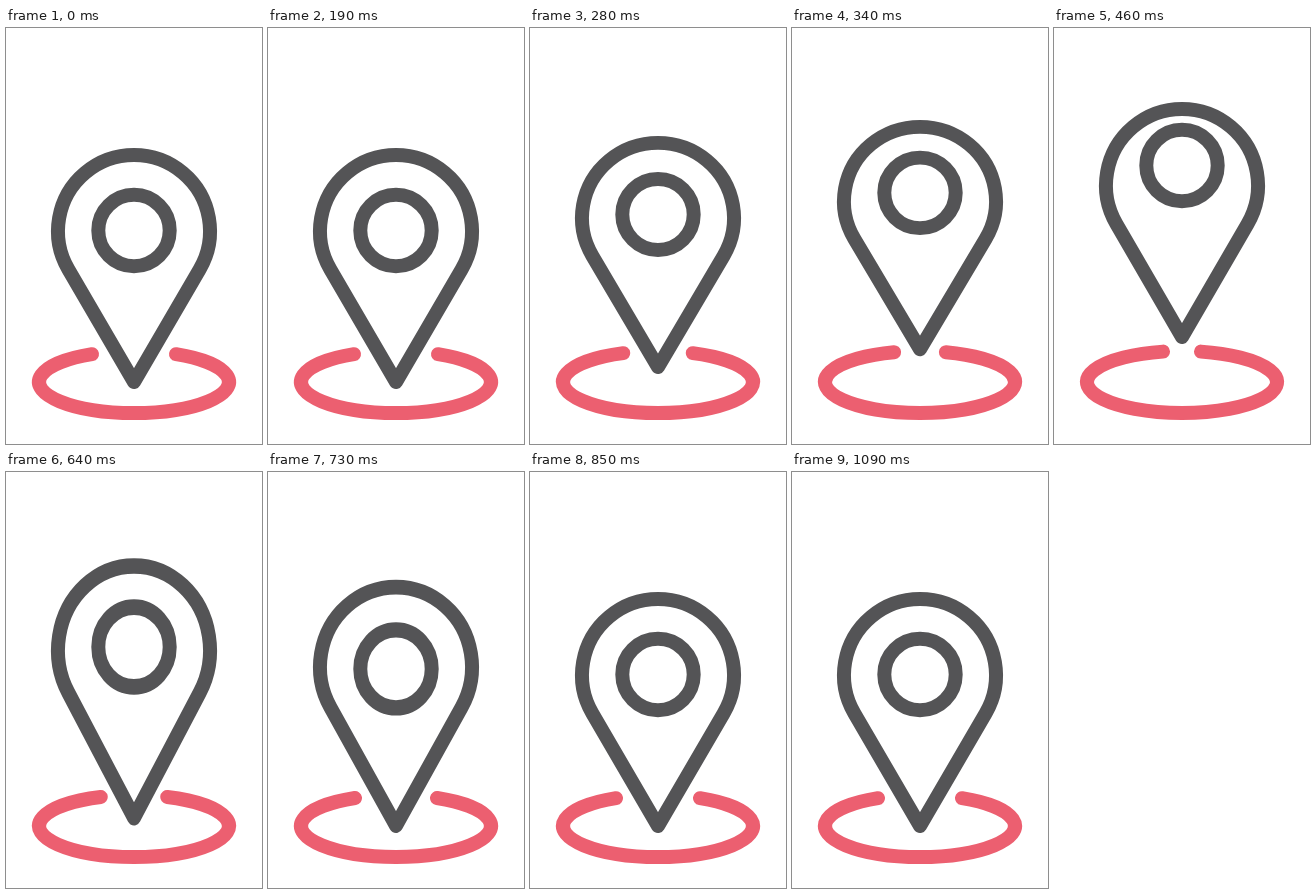
These frames come from a looping animation (256 by 416 pixels, 1.12 s). An HTML page:

```html
<!DOCTYPE html>
<html lang="en">
<head>
<meta charset="utf-8">
<title>Hopping map pin</title>
<style>
  html, body { margin: 0; width: 100%; height: 100%; overflow: hidden; background: #fff; }
  svg { display: block; width: 256px; height: 416px; }
  svg * { fill: none; stroke-width: 14; stroke-linecap: round; stroke-linejoin: round; }
  .pin { stroke: #545456; }
  #ring { stroke: #ec5f70; }
</style>
</head>
<body>
<svg viewBox="0 0 256 416">
  <path id="ring"/>
  <path id="body" class="pin" d="M128 354L62.3 241.2A76 76 0 1 1 193.7 241.2Z"/>
  <circle id="hole" class="pin" cx="128" cy="202.5" r="35.7"/>
</svg>
<script>
const LOOP = 1120, STEP = 30, CX = 128;
const [ring, body, hole] = ['ring', 'body', 'hole'].map(id => document.getElementById(id));

const ease = (t, a, b) => (1 - Math.cos(Math.PI * Math.min(1, Math.max(0, (t - a) / (b - a))))) / 2;

// Rises from 0 to 1 until `top`, holds until `fall`, and is back at 0 at `end`.
const hop = (t, top, fall, end) => ease(t, 190, top) - ease(t, fall, end);

// Lifts the upper and lower edge of a shape by separate amounts, stroke included.
function lift(shape, upper, lower, dUpper, dLower) {
  const k = (lower - dLower - upper + dUpper) / (lower - upper);
  shape.setAttribute('transform', `matrix(1 0 0 ${k} 0 ${upper - dUpper - k * upper})`);
}

function draw(t) {
  // The lower edges lead and the upper ones lag, so the pin stretches as it drops.
  lift(body, 120, 361, 46 * hop(t, 453, 540, 830), 45 * hop(t, 420, 460, 706));
  lift(hole, 159.8, 245.2, 65 * hop(t, 465, 460, 820), 65 * hop(t, 460, 460, 760));

  const gap = 42 - 23 * hop(t, 428, 460, 772);
  const end = 354 - 31 * Math.sqrt(1 - (gap / 95) ** 2);
  ring.setAttribute('d', `M${CX - gap} ${end}A95 31 0 1 0 ${CX + gap} ${end}`);
}

const start = performance.now();
function tick() {
  const t = (performance.now() - start) % LOOP;
  draw(Math.floor((t - 10) / STEP) * STEP + 10);
  requestAnimationFrame(tick);
}
tick();
</script>
</body>
</html>
```
